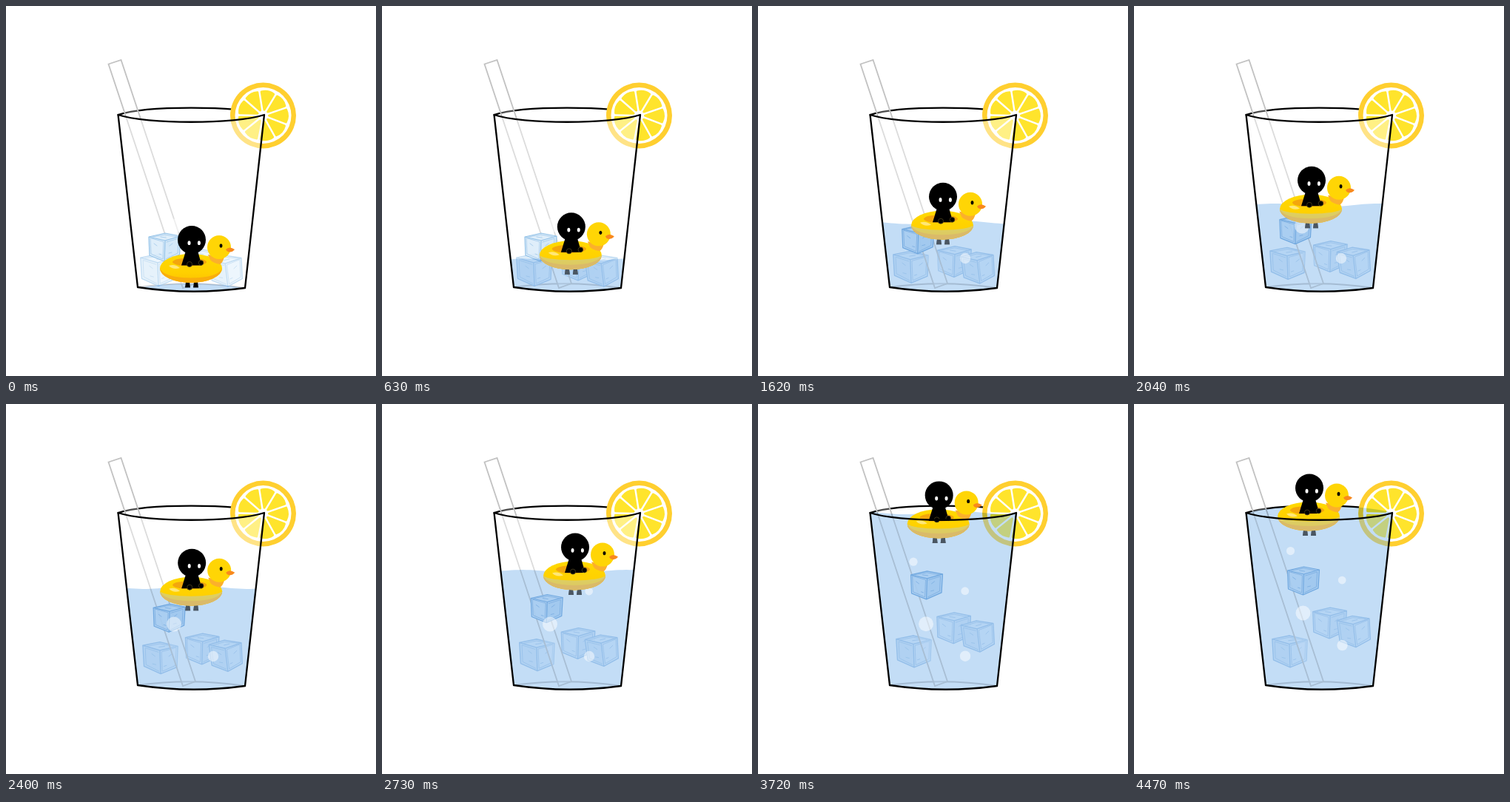
Write an HTML page that moves like this. It is 500 px wide and 500 px high and loops after 4.5 s.

```html
<!DOCTYPE html>
<html lang="en">
<head>
<meta charset="utf-8">
<title>Floating in a glass</title>
<style>
  html, body { margin: 0; width: 100%; height: 100%; overflow: hidden; background: #fff; }
  svg { display: block; width: 100vw; height: 100vh; }
  .line { fill: none; stroke: #000; stroke-width: 2.3; stroke-linecap: round; stroke-linejoin: round; }
  .water { fill: #c3ddf6; mix-blend-mode: multiply; }
  .bubble { fill: #fff; fill-opacity: .5; }
  .tint { fill: #b0cdea; }
</style>
</head>
<body>
<svg viewBox="0 0 500 500">
  <defs>
    <clipPath id="inside">
      <path d="M151.500 147C190 134.500 310 134.500 349 147L323 381Q250 391 178 380Z"/>
    </clipPath>
    <linearGradient id="float" x1="0" y1="0" x2="0" y2="1">
      <stop offset="0" stop-color="#ffd900"/>
      <stop offset=".65" stop-color="#ffd000"/>
      <stop offset="1" stop-color="#fdc000"/>
    </linearGradient>
    <path id="glass" d="M151.500 147C190 160 310 160 349 147L323 381Q250 391 178 380Z"/>
    <path id="feet" d="M-8 57H-3L-2 64.500H-9ZM3 57H8L9 64.500H2Z"/>
    <g id="cube" stroke-linejoin="round" stroke-linecap="round">
      <path d="M-21-14L1-19L22-15L20.500 10L0 19L-20 11Z" fill="#dcedfa" fill-opacity=".9"/>
      <path d="M1-9L22-15L20.500 10L0 19Z" fill="#cfe5f7" fill-opacity=".7"/>
      <path d="M-21-14L1-19L22-15L20.500 10L0 19L-20 11ZM-21-14L1-9L22-15M1-9L0 19" fill="none" stroke="#93c2e8" stroke-width="1.200"/>
      <path d="M-19-12L-18 9L-2 16L-1-7ZM3-7L19-12L18 8L2 16M-16-14L1-17L17-14M-14-5l4 3M-7 9l3 1M7-2l4-3M6 8l4-1M-5-14l7 1" fill="none" stroke="#a0c8ea" stroke-width=".8"/>
    </g>
  </defs>

  <rect width="500" height="500" fill="#fff"/>
  <path class="line" d="M151.500 147C190 134.500 310 134.500 349 147"/>

  <g transform="translate(347.500 148)">
    <circle r="44.500" fill="#ffcf2f"/>
    <circle r="38" fill="#fff"/>
    <g id="lemon" fill="#ffe42c" stroke="#ffe42c" stroke-width="3" stroke-linejoin="round"></g>
  </g>

  <path d="M178 380Q250 370 323 381" fill="none" stroke="#b9bcc0" stroke-width="2"/>
  <g id="back"></g>
  <path d="M138.500 78.500L155.500 73L256 375L239 381Z" fill="#fff" fill-opacity=".3" stroke="#c2c2c2" stroke-width="1.800"/>
  <use href="#glass" fill="#fff" fill-opacity=".42"/>
  <g id="front"></g>
  <g class="water" clip-path="url(#inside)"><path id="water"/></g>
  <g id="bubbles"></g>

  <g id="floater">
    <use href="#feet"/>
    <ellipse cx="-1" cy="38.500" rx="42" ry="19.500" fill="url(#float)"/>
    <path d="M-43 38.500A42 19.500 0 0 0 41 38.500Q36 51-1 51.500Q-38 51-43 38.500Z" fill="#f9ad0c"/>
    <ellipse cx="-3" cy="30" rx="23" ry="5.500" fill="#f3a60d"/>
    <path d="M-31 35q8-3 15 3q-9 3-15-3z" fill="#ffe778"/>
    <path d="M22 20L44 23Q42 31 38 33Q28 31 25 27Z" fill="#fbb02c"/>
    <circle cx="37" cy="10" r="16" fill="#ffd505"/>
    <path d="M46 13Q51 8 58 13Q55 17 50 16.500Q47 16 46 13Z" fill="#f8891d"/>
    <ellipse cx="39.500" cy="8" rx="2" ry="2.700"/>
    <path d="M-8 15H8L13.500 34.500H-14Z"/>
    <circle r="19"/>
    <ellipse cx="-3.500" cy="4.200" rx="2" ry="2.900" fill="#fff"/>
    <ellipse cx="9.900" cy="4.200" rx="2" ry="2.900" fill="#fff"/>
    <g stroke="#4d4320" stroke-width=".8">
      <circle cx="-3" cy="33" r="3.500"/>
      <circle cx="12.500" cy="31" r="3.300"/>
    </g>
    <g id="tint" class="tint">
      <path d="M-43 38.500A42 19.500 0 0 0 41 38.500Q33 44.500-1 45Q-35 44.500-43 38.500Z"/>
      <use href="#feet"/>
    </g>
  </g>

  <use href="#glass" class="line"/>
</svg>

<script>
const LOOP = 4500, STEP = 30;
const $ = id => document.getElementById(id);
const clamp = v => Math.max(0, Math.min(1, v));
const ease = v => { const u = clamp(v); return u * u * (3 - 2 * u); };
const smoothMax = (a, b, k) => b + k * Math.log(1 + Math.exp((a - b) / k));

function add(parent, tag, attrs) {
  const el = document.createElementNS('http://www.w3.org/2000/svg', tag);
  for (const key in attrs) el.setAttribute(key, attrs[key]);
  return parent.appendChild(el);
}

// Sideways drift: eased legs between turning points, [seconds, x].
const turns = [[0, 251], [1.2, 260], [2.04, 240], [2.73, 261], [4.32, 237]];
const floatX = s => turns.slice(1).reduce((x, [end, to], i) => {
  const [start, from] = turns[i];
  return x + (to - from) * ease((s - start) / (end - start));
}, turns[0][1]);
const floatY = s => smoothMax(316 - 23 * s - 8 * s * s, 113.5, 9);
const level = s => 375 - 50 * s - 0.22 * s ** 4;

const cubes = [
  { layer: 'back', x: 206, y: 357, dx: 5, rise: 22.5, start: 0.9, end: 3.5, form: 'scale(-1.1 1.13)' },
  { layer: 'back', x: 265, y: 350, dx: -1, rise: 54, start: 1, end: 4.5, form: 'scale(1.06 1.1)' },
  { layer: 'back', x: 298, y: 358, dx: 0, rise: 50.5, start: 1, end: 4.5, form: 'rotate(-5) scale(-1.02 1.12)' },
  { layer: 'front', x: 214, y: 326, dx: 14.5, rise: 87, start: 0.9, end: 4.25, form: '' }
];
for (const c of cubes) c.el = add($(c.layer), 'use', { href: '#cube' });

const bubbles = [[210, 213.5, 5.6], [279.7, 253, 5.4], [227, 297.5, 10], [280, 341, 7.2]]
  .map(([x, y, r]) => add($('bubbles'), 'circle', { class: 'bubble', cx: x, cy: y, r }));

for (let i = 0; i < 9; i++) {
  add($('lemon'), 'path', { d: 'M8 0L31-8.400Q35 0 31 8.400Z', transform: `rotate(${i * 40 - 79})` });
}

function waterPath(s) {
  const top = level(s), flat = clamp(s / 0.3);
  let d = 'M145 395';
  for (let x = 145; x <= 355; x += 5) {
    const wave = 2.2 * flat * Math.cos(2 * Math.PI * ((x - 190) / 140 + (s - 2.04) / 0.69));
    const mound = 6 * (1 - flat) * ((x - 250) / 72) ** 2;
    d += `L${x} ${(top - wave + mound).toFixed(2)}`;
  }
  return d + 'L355 395Z';
}

function draw(s) {
  $('water').setAttribute('d', waterPath(s));
  $('floater').setAttribute('transform', `translate(${floatX(s)} ${floatY(s)})`);
  $('tint').setAttribute('opacity', 0.42 * clamp(s / 0.45));
  for (const c of cubes) {
    const p = ease((s - c.start) / (c.end - c.start));
    c.el.setAttribute('transform', `translate(${c.x + c.dx * p} ${c.y - c.rise * p}) ${c.form}`);
  }
  const lift = 16 * clamp((s - 3.6) / 0.9) ** 2;
  for (const b of bubbles) b.setAttribute('transform', `translate(${lift * 0.1} ${-lift})`);
}

function tick() {
  draw(Math.floor(performance.now() % LOOP / STEP) * STEP / 1000);
  requestAnimationFrame(tick);
}
tick();
</script>
</body>
</html>
```
